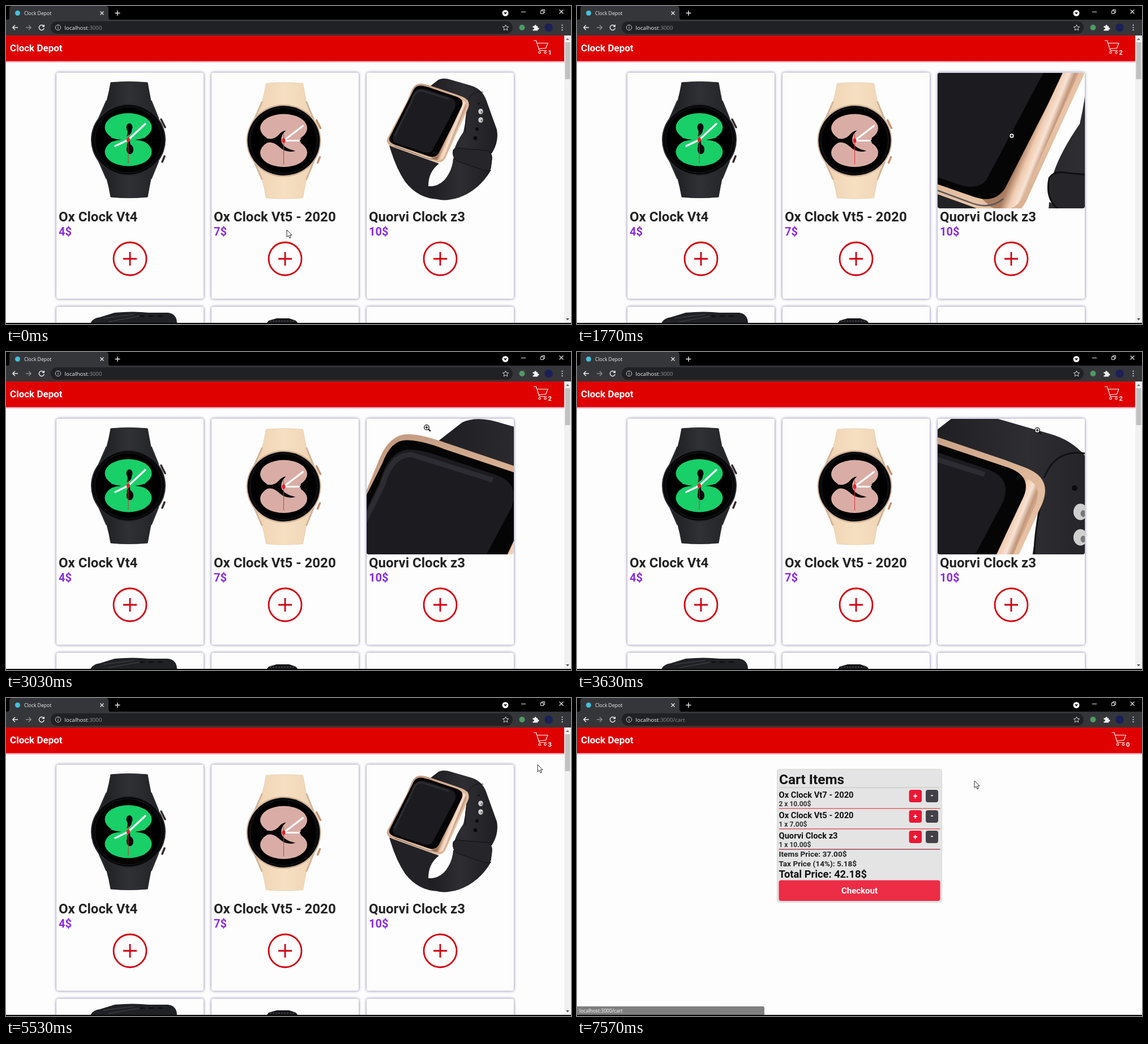
An HTML page that plays this animation: 998x561 px, repeating every 7.61 s.

```html
<!DOCTYPE html>
<html lang="en">
<head>
<meta charset="utf-8">
<title>Clock Depot</title>
<style>
  html, body { margin: 0; width: 998px; height: 561px; overflow: hidden; background: #fdfdfd; }
  svg { display: block; }
  text { font-family: Roboto, Arial, sans-serif; font-weight: 700; }
  .ui { font-family: "Open Sans", "Noto Sans", sans-serif; font-weight: 400; }
  .card { fill: #fdfdfd; filter: drop-shadow(0 0 2.5px rgba(30, 25, 100, .6)); }
  .wheel { fill: none; stroke: #fff; stroke-width: 1.1; }
</style>
</head>
<body>
<svg id="stage" width="998" height="561" viewBox="0 0 998 561">
  <defs>
    <linearGradient id="gold" x1="0" y1="0" x2="1" y2="1">
      <stop offset="0" stop-color="#b78e76"/><stop offset=".5" stop-color="#d9b193"/>
      <stop offset=".72" stop-color="#e9c4a6"/><stop offset="1" stop-color="#c4946f"/>
    </linearGradient>
    <linearGradient id="rim" gradientUnits="userSpaceOnUse" x1="782" y1="218" x2="797" y2="224">
      <stop offset="0" stop-color="#a97c5f"/><stop offset=".3" stop-color="#f0cbb0"/>
      <stop offset=".55" stop-color="#f7e3d4"/><stop offset=".75" stop-color="#c3977c"/>
      <stop offset="1" stop-color="#e6bd9c"/>
    </linearGradient>
    <linearGradient id="band" x1="0" y1="0" x2="1" y2="0">
      <stop offset="0" stop-color="#1d1d21"/><stop offset=".5" stop-color="#2d2d32"/>
      <stop offset="1" stop-color="#1f1f23"/>
    </linearGradient>
    <linearGradient id="dark" x1="0" y1="0" x2="1" y2="0">
      <stop offset="0" stop-color="#1c1d20"/><stop offset=".5" stop-color="#303135"/>
      <stop offset="1" stop-color="#222327"/>
    </linearGradient>
    <linearGradient id="sand" x1="0" y1="0" x2="1" y2="0">
      <stop offset="0" stop-color="#efd3b1"/><stop offset=".5" stop-color="#f6dfc2"/>
      <stop offset="1" stop-color="#efd5b5"/>
    </linearGradient>
    <linearGradient id="glow" x1="0" y1="0" x2="0" y2="1">
      <stop offset="0" stop-color="#e8475f"/><stop offset="1" stop-color="#fdfdfd"/>
    </linearGradient>
    <clipPath id="photo"><rect x="637" y="118" width="260" height="239" rx="4"/></clipPath>
    <clipPath id="view"><rect y="52" width="998" height="507"/></clipPath>
  </defs>
  <g clip-path="url(#view)">
    <g id="shop"></g>
    <g id="basket"></g>
    <g id="header"></g>
    <g id="scroll"></g>
  </g>
  <g id="chrome"></g>
  <g id="status">
    <path d="M0 544H328Q331 544 331 547V559H0Z" fill="#000"/>
    <text class="ui" x="4" y="555" font-size="8.6" fill="#fff">localhost:3000/cart</text>
  </g>
  <g id="cursor">
    <path id="arrow" d="M0 0V12.5L3 10L5 14.5L7.2 13.5L5.2 9.2H9Z" fill="#fff" stroke="#111" stroke-width=".9"/>
    <path id="hand" d="M-1 1Q0-1 1.3 1V7L3 6.2L4.5 7L6 6.6L8 8Q9 8 9 10V13L7 18H0L-4.2 11.5Q-5 9-2.8 9.6L-1 11.5Z" fill="#fff" stroke="#111" stroke-width=".9"/>
    <g id="lens">
      <path d="M2.5 2.5L6.8 6.8" stroke="#111" stroke-width="2.2"/>
      <circle r="4.3" fill="#fff" stroke="#111" stroke-width="1.3"/>
      <path d="M-2.4 0H2.4M0-2.4V2.4" stroke="#111" stroke-width="1.4"/>
    </g>
  </g>
</svg>
<script>
const LOOP = 7610;
const $ = id => document.getElementById(id);
const text = (x, y, size, fill, s, more = '') =>
  `<text x="${x}" y="${y}" font-size="${size}" fill="${fill}" ${more}>${s}</text>`;
const rect = (x, y, w, h, fill, rx = 0, more = '') =>
  `<rect x="${x}" y="${y}" width="${w}" height="${h}" rx="${rx}" fill="${fill}" ${more}/>`;
const path = (d, fill, more = '') => `<path d="${d}" fill="${fill}" ${more}/>`;
const stroke = (d, color, w, more = '') =>
  path(d, 'none', `stroke="${color}" stroke-width="${w}" ${more}`);
const oval = (x, y, rx, ry, fill, more = '') =>
  `<ellipse cx="${x}" cy="${y}" rx="${rx}" ry="${ry}" fill="${fill}" ${more}/>`;
const at = (x, y, s) => `<g transform="translate(${x} ${y})">${s}</g>`;

// Round watch, drawn around its centre
function roundWatch(strap, body, face, edge, buttons, detail) {
  const half = 'M-31-101Q0-104 34-101Q37-84 40-69L52-39L40-42H-38L-51-39L-38-69Q-34-84-31-101Z';
  return path(half, strap, `stroke="${edge}" stroke-width=".8"`) +
    path(half, strap, `transform="scale(1 -1)" stroke="${edge}" stroke-width=".8"`) +
    stroke('M-38-69L-52-37M40-69L53-37M-38 69L-52 37M40 69L53 37', body, 3) +
    stroke('M58-36L65-22M60 39L64 29', buttons, 3.5, 'stroke-linecap="round"') +
    oval(0, 0, 66, 64, body) + oval(0, 0, 64, 61.5, '#08080a') +
    oval(0, 0, 59, 58, '#000', 'stroke="#25262a" stroke-width=".7"') +
    oval(0, -22, 41.5, 25, face) + oval(0, 21.5, 41.5, 25, face) +
    path('M-30-12H30V12H-30Z', face) + detail +
    stroke('M0-11V42', '#dc2b38', 1) + oval(0, 0, 3, 4, '#e81e2e');
}

const greenWatch = roundWatch('url(#dark)', '#292a2e', '#18cf68', '#17181a', '#36282a',
  oval(2, -22, 5.5, 7, '#050505') + path('M6-18Q7-10-3-6Q0-11-2-19Z', '#050505') +
  oval(3, 17, 6, 8.5, '#050505') + path('M-2 14Q-4 6 3 1Q2 8 8 15Z', '#050505') +
  path('M-43-9Q-31-2-12 0Q-28 1-42 10ZM43-9Q31-2 12 0Q28 1 42 10Z', '#000') +
  stroke('M0 0L-23 11M0 0L30-28', '#fff', 3.4, 'stroke-linecap="round"'));

const sandWatch = roundWatch('url(#sand)', '#d3b498', '#d9ada5', '#e8cdab', '#c99370',
  path('M-43-10Q-34-3-22-3Q-13-5-8-11Q-3-17 4-18Q-6-9-4 2Q0 14 21 18Q4 23-9 10Q-17 3-25 3Q-35 4-43 11Z', '#050505') +
  path('M43-9Q35-1 25 0Q35 2 43 10Z', '#050505') +
  stroke('M0 0H27M0 0L34-26', '#fff', 3.2, 'stroke-linecap="round"') +
  stroke('M0-5V2', '#f1932e', 3));

const squareWatch =
  path('M746 144L764 130Q773 126 787 130.5L820 140Q842 146 849 168L867 218Q871 240 858 260L790 262Q792 245 808 222Q813 200 814 176Z', 'url(#band)') +
  stroke('M817 166Q824 148 843 152M817 172Q809 206 812 225', '#121215', 1) +
  path('M790 268L857 289Q836 325 800 338Q776 345 762 341Q744 333 746 318Q770 319 782 296Q789 284 790 268Z', 'url(#band)') +
  path('M677 246L765 278Q746 292 746 318Q747 336 764 341Q728 340 705 310Q688 285 677 246Z', '#222226') +
  path('M790 254Q793 249 802 251L850 255Q860 259 858 272L856 287Q850 293 842 289L800 275Q787 269 790 254Z', '#26262a', 'stroke="#101013" stroke-width="1"') +
  [[835, 172, 1.6], [832, 217, 3], [829, 233, 3.5]].map(([x, y, r]) => oval(x, y, r, r, '#0b0b0d')).join('') +
  [186, 201].map(y => oval(838.5, y, 4.2, 4.8, '#cfcfcf') + oval(840, y + 1, 1.5, 2, '#77777a')).join('') +
  path('M732 137Q740 137 754 142L794 155.5L806 160Q822 166 816 181L778 264Q772 280 757 275L684 249Q669 243 674 233L708 169L715 152Q721 137 732 137Z', 'url(#gold)') +
  path('M803 165Q817 169 812 182L775 264Q769 276 756 271L748 264L764 258L803 180Z', 'url(#rim)') +
  path('M731 140.5Q740 140.5 754 146L796 160Q810 165 805 177L789 211L764 260Q758 269 746 265L685 244Q674 239 678 231L711 166L717 154Q722 140.5 731 140.5Z', '#050506') +
  path('M733 146Q740 146 754 151L784 161Q798 166 793 180L753 255Q748 261 738 258L690 242Q680 238 684 229L715 166Q721 146 733 146Z', '#1b1b20') +
  stroke('M686 230L717 167Q722 149 734 149L782 164', '#2c2c32', 3) +
  stroke('M686 247L743 268Q755 273 763 266', '#55555a', .8);

const plus = x => `<circle cx="${x}" cy="446" r="29" fill="none" stroke="#d2000f" stroke-width="2.8"/>` +
  stroke(`M${x - 12} 446h24M${x} 434v24`, '#d2000f', 2.8);

function buildShop() {
  const items = [['Ox Clock Vt4', '4$'], ['Ox Clock Vt5 - 2020', '7$'], ['Quorvi Clock z3', '10$']];
  let s = rect(0, 52, 998, 509, '#fdfdfd');
  items.forEach(([name, price], i) => {
    const x = 89 + 274 * i;
    s += rect(x, 117.5, 260, 399, '#fdfdfd', 4, 'class="card"') +
      rect(x, 530.5, 260, 399, '#fdfdfd', 4, 'class="card"') +
      text(x + 4, 379.5, 24, '#222', name) + text(x + 4, 404.5, 20, '#8a2be2', price) + plus(x + 130);
  });
  s += at(216, 236, greenWatch) + at(490.5, 237.5, sandWatch) + squareWatch;
  s += path('M149 560Q152 551 166 549L192 541Q225 538 252 541L286 541Q302 543 302 560Z', '#202125') +
    stroke('M172 551L226 544M181 557L236 547', '#3b3c41', 1.5) +
    stroke('M236 547h48', '#0f0f11', 2.5, 'stroke-dasharray="9 7"') +
    path('M460 560L464 555L478 551H500L512 555L516 560Z', '#18181b') +
    stroke('M466 556h46', '#3a3a3f', 2, 'stroke-dasharray="3 2"');
  s += `<g id="zoom" clip-path="url(#photo)">${rect(637, 118, 260, 239, '#fdfdfd')}<g id="big">${squareWatch}</g></g>`;
  $('shop').innerHTML = s;
  $('scroll').innerHTML = rect(986, 52, 12, 509, '#f1f1f1') + rect(987.5, 64, 9, 65, '#c1c1c1') +
    path('M989 60h6l-3-3.5Z', '#777') + path('M989 551h6l-3 3.5Z', '#505050');
}

function buildBasket() {
  const rows = [['Ox Clock Vt7 - 2020', '2 x 10.00$', '#e0453c'], ['Ox Clock Vt5 - 2020', '1 x 7.00$', '#d63a35'],
    ['Quorvi Clock z3', '1 x 10.00$', '#8d1f2c']];
  let s = rect(0, 52, 998, 509, '#fdfdfd') +
    rect(353.5, 125.5, 291, 235, '#e4e4e5', 4, 'stroke="#d9d9d2"') +
    text(357, 152, 24.4, '#111', 'Cart Items') + rect(357, 157.5, 285, 1, '#c4c4ba');
  rows.forEach(([name, sum, color], i) => {
    const y = 36 * i;
    s += text(356.5, 176 + y, 14.7, '#111', name) + text(356.5, 191 + y, 12, '#333', sum) +
      rect(586.5, 162 + y, 22.5, 22, '#ea1733', 4) + rect(616, 162 + y, 22, 22, '#434147', 4) +
      text(597.7, 178 + y, 14, '#fff', '+', 'text-anchor="middle"') +
      text(627, 177 + y, 14, '#fff', '-', 'text-anchor="middle"') +
      rect(356.5, 194.3 + y, 285, 1.2, color);
  });
  s += text(356.5, 279.5, 13.6, '#222', 'Items Price: 37.00$') +
    text(356.5, 296.5, 13.6, '#222', 'Tax Price (14%): 5.18$') +
    text(356.5, 317, 18.3, '#111', 'Total Price: 42.18$') +
    rect(356.5, 321.5, 285, 36.5, '#ed2c45', 4) +
    text(499, 345, 15, '#fff', 'Checkout', 'text-anchor="middle"');
  $('basket').innerHTML = s;
}

function buildHeader() {
  $('header').innerHTML =
    rect(0, 96, 998, 4.5, 'url(#glow)') + rect(0, 52, 998, 45, '#df0000') +
    text(7, 79.5, 17, '#fff', 'Clock Depot') +
    `<g id="trolley">${stroke('M932 61h4.5L942 78.5H955M938 65.5H957L953.5 74.5L941 75.5', '#fff', 1.2)}` +
    [942.5, 952.5].map(x => `<circle class="wheel" cx="${x}" cy="82" r="1.8"/>`).join('') +
    text(957.5, 85.5, 11, '#fff', '', 'id="count"') + '</g>';
}

function buildChrome() {
  const ui = 'class="ui"';
  $('chrome').innerHTML =
    rect(0, 0, 998, 24.5, '#000') +
    path('M2 24.5Q6 24 6 19V5Q6 0 11 0H176Q181 0 181 5V19Q181 24 185 24.5Z', '#35363a') +
    rect(0, 24, 998, 28, '#35363a') + rect(79, 27, 816, 22, '#202124', 11) +
    rect(0, 559, 998, 2, '#080808') +
    oval(20.5, 12.5, 4.5, 4.5, '#47bfdc') +
    text(32, 15.5, 8.6, '#f1f1f1', 'Clock Depot', ui) +
    stroke('M166.5 9.5l6 6m0-6l-6 6', '#eee', 1.2) + stroke('M192.5 12.5h9M197 8v9', '#eee', 1.4) +
    oval(882, 12.5, 5.5, 5.5, '#f4f4f4') + path('M879 11.2h6l-3 3.6Z', '#111') +
    stroke('M910 10.5h8', '#eee', 1) + stroke('M944.5 8.5h5v5h-5ZM946.5 8V6.5h5v5H950', '#eee', 1) +
    stroke('M977.5 6.5l7 7m0-7l-7 7', '#eee', 1.1) +
    stroke('M21 38H12M16 33.8L11.8 38L16 42.2', '#eee', 1.4) +
    stroke('M35 38h9M40 33.8L44.2 38L40 42.2', '#8b8c8f', 1.4) +
    stroke('M66.6 35.5A4.5 4.5 0 1 0 67.3 39', '#eee', 1.4) + path('M68 32.5v4.6h-4.6Z', '#eee') +
    stroke('M92 37.2v3.4M92 34.8v1.3', '#ccc', 1.1) +
    '<circle cx="92" cy="38" r="4.7" fill="none" stroke="#ccc"/>' +
    `<text class="ui" x="103.5" y="41.5" font-size="9.8" fill="#f1f1f1">localhost<tspan fill="#8e9094">:3000</tspan><tspan id="route" fill="#8e9094"></tspan></text>` +
    stroke('M882.5 33l1.5 3.5 3.7.3-2.8 2.5.9 3.6-3.3-2-3.3 2 .9-3.6-2.8-2.5 3.7-.3Z', '#d5d5d5', 1) +
    oval(911.5, 38, 5, 5, '#4f9b62') +
    path('M930.5 35.5h3a1.7 1.7 0 1 1 3.2 0h2.5v2.8a1.7 1.7 0 1 1 0 3.1v2h-8.7v-2.3a1.7 1.7 0 1 0 0-3Z', '#f1f1f1') +
    oval(958.5, 38, 7.3, 7.3, '#1b2056') +
    [33.8, 38, 42.2].map(y => oval(982.5, y, 1.1, 1.1, '#ddd')).join('');
}

// time, x, y
const TRAIL = [
  [0, 496, 395], [60, 496, 396], [520, 493, 447], [950, 493, 447], [1260, 626, 400], [1400, 672, 335],
  [1660, 768, 229], [1790, 768, 229], [2400, 712, 206], [3030, 743, 133], [3240, 752, 128],
  [3630, 813, 138], [4030, 806, 268], [4430, 775, 391], [4640, 767, 447], [4870, 767, 447],
  [5250, 880, 260], [5640, 953, 84], [6450, 956, 83.5], [7100, 956, 83.5], [7540, 702, 146], [LOOP, 702, 146]
];

function pointer(t) {
  const i = Math.max(1, TRAIL.findIndex(k => k[0] > t));
  const [a, b] = [TRAIL[i - 1], TRAIL[i]];
  const u = (t - a[0]) / (b[0] - a[0]);
  const e = u * u * (3 - 2 * u);
  return [a[1] + (b[1] - a[1]) * e, a[2] + (b[2] - a[2]) * e];
}

const inPhoto = ([x, y]) => x >= 637 && x <= 897 && y >= 118 && y <= 357;
const show = (id, on) => $(id).setAttribute('display', on ? 'inline' : 'none');

function draw(t) {
  const p = pointer(t), [x, y] = p;
  const cartPage = t >= 6020;
  const zoomed = !cartPage && inPhoto(p);
  const onPlus = !cartPage && [219, 493, 767].some(c => Math.hypot(x - c, y - 446) < 29);
  const onCart = x > 930 && x < 982 && y > 58 && y < 90;

  show('shop', !cartPage);
  show('scroll', !cartPage);
  show('basket', cartPage);
  show('zoom', zoomed);
  $('big').setAttribute('transform', `translate(${-2 * x} ${-2 * y}) scale(3)`);
  $('trolley').setAttribute('transform', `translate(${cartPage ? 12.5 : 0} 0)`);
  $('count').textContent = cartPage ? 0 : t < 930 ? 1 : t < 4830 ? 2 : 3;
  $('route').textContent = cartPage ? '/cart' : '';

  show('status', t >= 5680);
  $('status').setAttribute('opacity', t < 7460 ? 1 : Math.max(0, 1 - (t - 7460) / 220));

  show('lens', zoomed);
  show('hand', !zoomed && (onPlus || onCart));
  show('arrow', !zoomed && !onPlus && !onCart);
  $('cursor').setAttribute('transform', `translate(${x} ${y})`);
}

buildShop();
buildBasket();
buildHeader();
buildChrome();
const start = performance.now();
function tick() {
  draw((performance.now() - start) % LOOP);
  requestAnimationFrame(tick);
}
tick();
</script>
</body>
</html>
```
